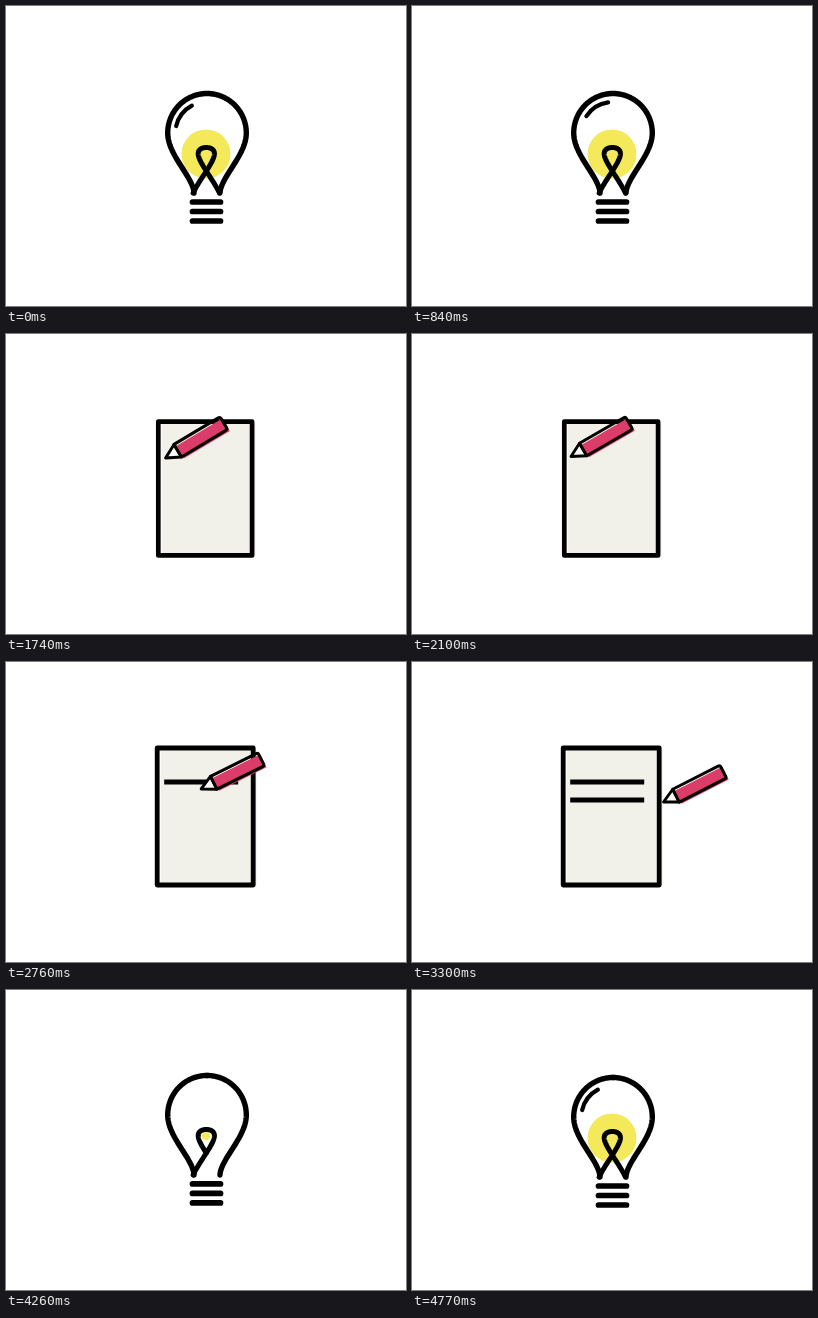
An HTML page with a canvas for the animation above (4.8 s loop, 400 by 300 pixels).

```html
<!DOCTYPE html>
<html lang="en">
<head>
<meta charset="utf-8">
<title>Idea to paper</title>
<style>
html, body { margin: 0; width: 100%; height: 100%; overflow: hidden; background: #fff; }
canvas { display: block; }
</style>
</head>
<body>
<canvas id="stage" width="400" height="300"></canvas>
<script>
const LOOP = 4800, RAD = Math.PI / 180;
const ctx = document.getElementById('stage').getContext('2d');

// One outline rule covers bulb and pencil: a side from foot to shoulder, then a rounded cap.
const BULB = { x: 201, lean: 0, foot: 13, belly: 39.3, bow: 0, low: 187, high: 127, cap: 39.5, power: 1 };
const BOWED = { x: 199, lean: 3, foot: 12, belly: 15.3, bow: 2.5, low: 195, high: 104, cap: 8, power: 0.45 };
const STRAIGHT = { x: 198, lean: 0, foot: 13, belly: 13, bow: 0, low: 193, high: 99, cap: 4, power: 0.45 };

const clamp = x => Math.max(0, Math.min(1, x));
const lin = (t, a, b) => clamp((t - a) / (b - a));
const smooth = p => p * p * (3 - 2 * p);
const ease = (t, a, b) => smooth(lin(t, a, b));
const mix = (a, b, p) => a + (b - a) * p;
const blend = (a, b, p) =>
  Object.fromEntries(Object.keys(a).map(key => [key, mix(a[key], b[key], p)]));

// Curves take u from -1 (left end) over 0 (middle) to 1 (right end).
const outline = s => u => {
  const rise = clamp(2 - 2 * Math.abs(u));
  const turn = clamp(1 - 2 * Math.abs(u)) * Math.PI / 2;
  const side = mix(s.foot, s.belly, smooth(rise ** 0.88)) + s.bow * Math.sin(Math.PI * rise);
  const width = side * Math.max(0, Math.cos(turn)) ** s.power;
  return [s.x + s.lean * rise + Math.sign(u) * width,
    mix(s.low, s.high, rise) - s.cap * Math.sin(turn) ** s.power];
};

// A crossed loop that opens into the V of the pencil tip.
const filament = p => u => [
  mix(200.3 - (8 + 6 * u ** 4) * Math.sin(Math.PI * u / 0.72), 198 + 12 * u + Math.abs(u), p),
  mix(141.5 + 45.5 * u * u, 220 - 25 * Math.abs(u), p)];

function stroke(width) {
  ctx.lineWidth = width;
  ctx.strokeStyle = '#000';
  ctx.stroke();
}

function trace(curve, from, to, width) {
  const steps = 120;
  ctx.beginPath();
  for (let i = 0; i <= steps; i++) ctx.lineTo(...curve(mix(from, to, i / steps)));
  stroke(width);
}

function line(x1, y1, x2, y2, width) {
  ctx.beginPath();
  ctx.moveTo(x1, y1);
  ctx.lineTo(x2, y2);
  stroke(width);
}

function glow(radius) {
  ctx.beginPath();
  ctx.arc(200, 148, radius, 0, 7);
  ctx.fillStyle = '#f3e95b';
  ctx.fill();
}

function glare(start, sweep) {
  if (sweep <= 0) return;
  ctx.beginPath();
  ctx.arc(200.4, 127, 31, start * RAD, (start + sweep) * RAD);
  stroke(4.2);
}

function bar(row, size, dx = 0, dy = 0) {
  const x = 200.5 + dx, y = 196 + 9.5 * row + dy;
  if (size > 0) line(x - 14 * size, y, x + 14 * size, y, 5.7);
}

function bulbOut(t) {
  const pulse = 2.3 * Math.sin(Math.PI * lin(t, 0, 540));
  glow((24.5 + pulse) * (1 - ease(t, 900, 1080)));
  glare(193 + 20 * ease(t, 0, 600), 49 * (1 - ease(t, 880, 1020)));
  for (let row = 0; row < 3; row++) {
    const start = 960 + 40 * row;
    bar(row, 1 - ease(t, start, start + 180), 0, 4 * ease(t, 880, 1060));
  }
  const morph = ease(t, 1000, 1400);
  const shape = blend(blend(BULB, BOWED, morph), STRAIGHT, ease(t, 1440, 1500));
  trace(outline(shape), -1, 1, 5.4);
  trace(filament(morph), -1, 1, 5);
  const cut = 24 * lin(t, 1415, 1500);
  if (cut > 0) line(187, 193, 187 + cut, 193, 4.5);
}

function bulbIn(t) {
  ctx.save();
  ctx.translate(0, 13 - 15.5 * ease(t, 3860, 4150) + 2.5 * ease(t, 4200, 4420));
  glow(24.5 * ease(t, 4200, 4430));

  const grown = lin(t, 3680, 3940), shape = outline(BULB);
  if (grown > 0) for (const end of [-1, 1]) trace(shape, end, end * (1 - grown), 5.4);
  const wire = lin(t, 4020, 4300);
  if (wire > 0) trace(filament(0), -1, 2 * wire - 1, 5);

  const middle = lin(t, 3835, 3990);
  bar(0, lin(t, 3705, 3885), 24 * (1 - ease(t, 3740, 4010)));
  bar(1, middle, -2.5 * (1 - middle));
  bar(2, lin(t, 3660, 3800), -20 * (1 - ease(t, 3660, 3955)));
  glare(193, 49 * ease(t, 4400, 4640));
  ctx.restore();
}

// Progress of the two written lines and the move between them.
const writing = t => ({
  first: ease(t, 2150, 2600), back: ease(t, 2610, 2910), second: ease(t, 2910, 3210) });

function paper(t) {
  const gone = ease(t, 3460, 3690);
  const scale = ease(t, 1510, 1720) * mix(0.977, 1, ease(t, 2100, 2250)) * (1 - gone);
  if (scale <= 0) return;
  ctx.save();
  ctx.translate(199.2, mix(154.5, 205, gone));
  ctx.scale(scale, scale);
  ctx.fillStyle = '#f2f1e9';
  ctx.fillRect(-44.5, -66, 96, 136);
  ctx.beginPath();
  ctx.rect(-48, -68.5, 96, 137);
  stroke(4.8);

  ctx.lineCap = 'butt';
  const { first, second } = writing(t);
  [first, second].forEach((p, i) => {
    const y = -34.5 + 18 * i;
    if (p > 0) line(-41, y, -41 + 74 * p, y, 5);
  });
  ctx.restore();
}

function pencil(t) {
  const { first, back, second } = writing(t);
  const turn = ease(t, 1500, 1760);
  const wobble = 2 * Math.sin(first * 7) + Math.sin(second * 7);
  const x = mix(198, 159, turn) + 73 * (first - back + second) + 34 * ease(t, 3180, 3400);
  const y = mix(219, 122.5, turn) + 17.5 * back * back;
  const a = (-90 + 60 * turn + 3 * first + wobble * (1 - back)) * RAD;
  const scale = mix(1.85, 1, turn);

  ctx.save();
  ctx.globalAlpha = 1 - ease(t, 3320, 3450);
  ctx.translate(x, y);
  ctx.rotate(a);
  ctx.scale(scale, scale);

  ctx.beginPath();
  ctx.moveTo(0, 0);
  ctx.lineTo(14, -7.2);
  ctx.lineTo(14, 7.2);
  ctx.closePath();
  ctx.fillStyle = '#fafaf6';
  ctx.fill();
  stroke(2.9);

  // The colour sits slightly down and right of the outline.
  ctx.save();
  ctx.globalAlpha *= lin(t, 1490, 1580);
  ctx.rotate(-a);
  ctx.translate(2.2, 1.6);
  ctx.rotate(a);
  ctx.fillStyle = '#dc3c69';
  ctx.fillRect(14, -7.2, 53, 14.4);
  ctx.restore();

  ctx.beginPath();
  ctx.roundRect(14, -7.2, 53, 14.4, [0, 2, 2, 0]);
  stroke(3);
  ctx.restore();
}

function draw() {
  const t = performance.now() % LOOP;
  ctx.fillStyle = '#fff';
  ctx.fillRect(0, 0, 400, 300);
  ctx.lineCap = ctx.lineJoin = 'round';
  if (t < 1500) {
    bulbOut(t);
  } else {
    paper(t);
    if (t < 3450) pencil(t);
    if (t >= 3660) bulbIn(t);
  }
  requestAnimationFrame(draw);
}
draw();
</script>
</body>
</html>
```
